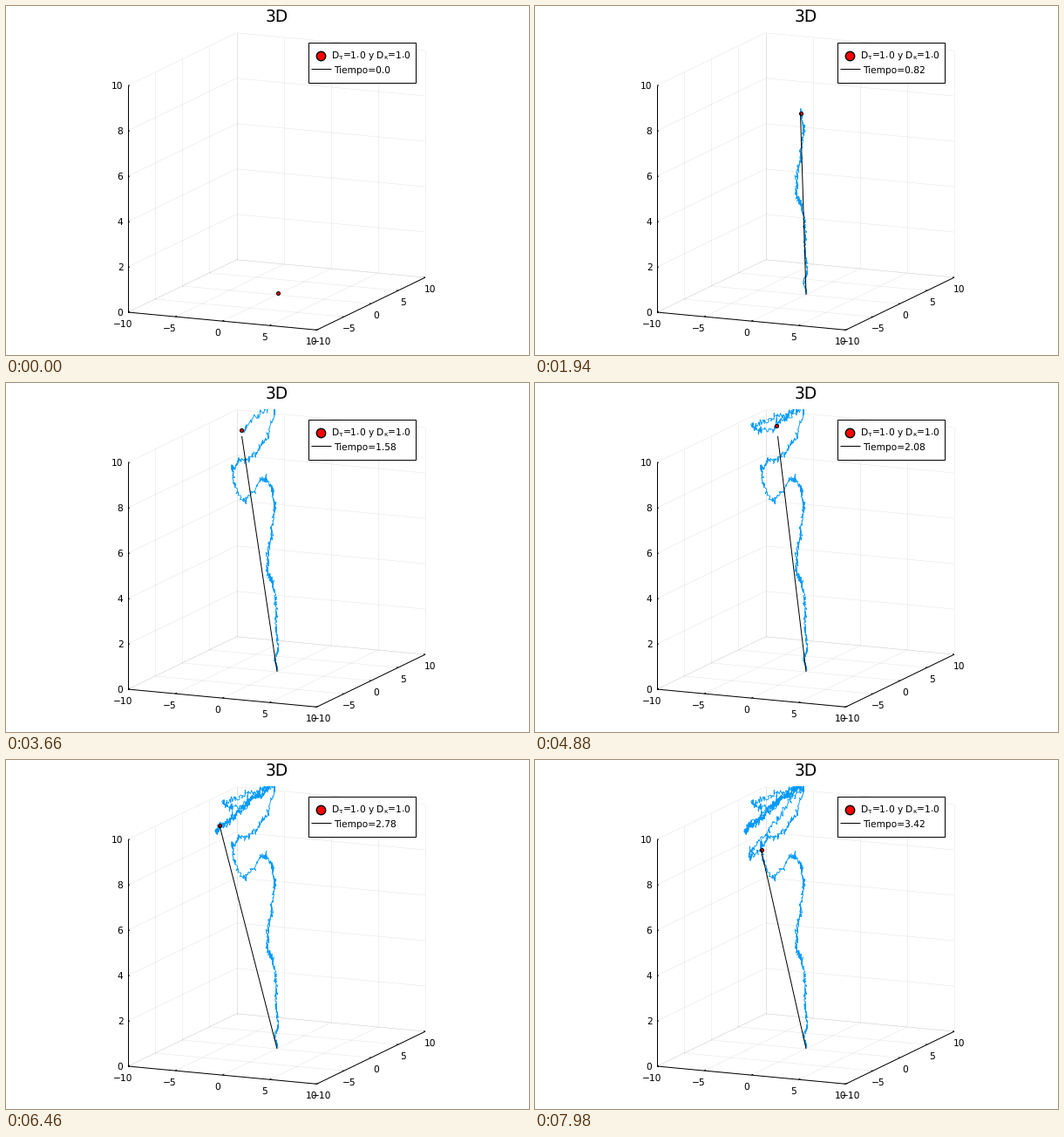
These frames come from a looping animation (600 px wide and 400 px high, 8 s). A matplotlib script:

```python
import numpy as np
import matplotlib.pyplot as plt
from matplotlib.animation import FuncAnimation
from matplotlib.collections import LineCollection
from matplotlib.patches import Rectangle
from matplotlib.transforms import Bbox

W, H, DPI = 600, 400, 100
PT = 72 / DPI               # points per pixel
STEPS = 171
SUB = 7                     # trail points per step
BLUE = "#009AFA"
ORIGIN = np.array([311.0, 331.0])
TOP = (308, 27)             # turning point just above the view

plt.rcParams.update({"font.family": "DejaVu Sans", "text.hinting": "none"})
fig = plt.figure(figsize=(W / DPI, H / DPI), dpi=DPI, facecolor="white")
ax = fig.add_axes([0, 0, 1, 1])
ax.set_xlim(0, W)
ax.set_ylim(H, 0)
ax.axis("off")


def proj(x, y, z):
    u, v = (x + 10) / 20, (y + 10) / 20
    return np.array([140 + 216.5 * u + 124.5 * v,
                     351 + 20.3 * u - 60.2 * v - 26 * z])


def label(x, y, s, px=10.67, ha="center"):
    return ax.text(x, y, s, fontsize=px * PT, ha=ha, va="baseline", zorder=10)


def segments(segs, color, lw, z):
    ax.add_collection(LineCollection(segs, colors=color, linewidths=lw * PT,
                                     zorder=z))


def draw_box():
    wide, tall = np.linspace(-10, 10, 5), np.linspace(0, 10, 6)
    grid, ticks = [], []
    for t in wide:
        grid += [(proj(t, -10, 0), proj(t, 10, 0)),
                 (proj(-10, t, 0), proj(10, t, 0)),
                 (proj(-10, t, 0), proj(-10, t, 10)),
                 (proj(t, 10, 0), proj(t, 10, 10))]
        name = f"{t:.0f}".replace("-", "\u2212")
        p, q = proj(t, -10, 0), proj(10, t, 0)
        ticks += [(p, p + (2, -1)), (q, q - (2, 0.2))]
        label(p[0] - 6, p[1] + 17, name)
        label(q[0] + 6, q[1] + 16.5, name)
    for t in tall:
        grid += [(proj(-10, -10, t), proj(-10, 10, t)),
                 (proj(-10, 10, t), proj(10, 10, t))]
        p = proj(-10, -10, t)
        ticks.append((p, p + (2, 0.2)))
        label(134.5, p[1] + 4, f"{t:.0f}", ha="right")
    left, front = proj(-10, -10, 0), proj(10, -10, 0)
    axes = [(left, proj(-10, -10, 10)), (left, front),
            (front, proj(10, 10, 0))]
    segments(grid, (0, 0, 0, 0.1), 0.55, 1)
    segments(axes + ticks, "black", 1, 2)


def draw_legend():
    ax.add_patch(Rectangle((346.5, 42), 123.5, 45.5, fc="white", ec="black",
                           lw=PT, zorder=8))
    ax.plot([361.4], [57], "o", ms=10.4 * PT, mfc="red", mec="black",
            mew=1.4 * PT, zorder=9)
    segments([((350, 72), (373, 72))], "black", 1, 9)
    label(372.6, 59.5, r"D$_{\mathregular{\tau}}$=1.0 y "
                       r"D$_{\mathregular{\kappa}}$=1.0", ha="left")
    return label(376, 76.5, "", ha="left")


# Turning points of the walk: step, (x, y)
TURNS = [(0, (312, 329)), (15, (308, 238)), (23, (300, 212)),
         (37, (308, 138)), (41, (304.5, 123)), (45, (295, 108)),
         (49, (277, 132)), (55, (259, 104)), (59, (265.5, 95)),
         (68, (298, 62)), (73, TOP), (79, (269.5, 54)), (83, (251, 53)),
         (96, TOP), (104, (277, 48.5)), (114, (242, 82)), (125, TOP),
         (139, (245, 75)), (150, TOP), (167, (247, 110)),
         (STEPS, (259.5, 103))]
T = np.array([t for t, _ in TURNS], float)
P = np.array([p for _, p in TURNS], float)
SLOPE = np.gradient(P, T, axis=0)


def particle(s):
    """Smooth cubic path through the turning points."""
    i = np.clip(np.searchsorted(T, s, side="right") - 1, 0, len(T) - 2)
    h = (T[i + 1] - T[i])[..., None]
    f = (np.asarray(s) - T[i])[..., None] / h
    ease = f * f * (3 - 2 * f)
    return (P[i] + (P[i + 1] - P[i]) * ease
            + h * f * (1 - f) * (SLOPE[i] * (1 - f) - SLOPE[i + 1] * f))


def make_trail():
    rng = np.random.default_rng(7)
    s = np.arange(STEPS * SUB + 1) / SUB
    jitter = rng.normal(size=(s.size, 2))
    drift = np.column_stack([np.convolve(j, np.ones(16) / 4, "same")
                             for j in jitter.T])
    trail = particle(s) + jitter * (0.8, 2) + drift * (0.8, 1.3)
    return np.minimum(trail, np.column_stack([np.where(s > 60, 308, 314),
                                              np.full(s.size, 331)]))


TRAIL = make_trail()

draw_box()
label(311, 18, "3D", 18.67)
clock = draw_legend()
trail, = ax.plot([], [], color=BLUE, lw=0.9 * PT, zorder=3)
dot, = ax.plot([], [], "o", ms=4 * PT, mfc="red", mec="black", mew=PT,
               zorder=4)
ray, = ax.plot([], [], color="black", lw=PT, solid_capstyle="butt", zorder=5)
view = Bbox.from_extents(140, H - 372, 482, H - 30)
for line in (trail, dot, ray):
    line.set_clip_box(view)


def step_at(ms):
    """Steps last 100, 20 and 20 ms in turn, after a first one of 20 ms."""
    if ms < 20:
        return 0
    turn, rest = divmod(ms - 20, 140)
    return 1 + 3 * turn + (rest >= 100) + (rest >= 120)


def update(frame):
    s = step_at(frame * 20)
    p = particle(s)
    trail.set_data(*np.vstack([TRAIL[:s * SUB], p]).T)
    dot.set_data([p[0]], [p[1]])
    dot.set_visible(bool(p[1] >= 31))
    reach = min(1, 270 / (ORIGIN[1] - p[1])) if s else 0
    ray.set_data(*np.array([ORIGIN, ORIGIN + reach * (p - ORIGIN)]).T)
    clock.set_text(f"Tiempo={round(s * 0.02, 2)}")
    return trail, dot, ray, clock


anim = FuncAnimation(fig, update, frames=400, interval=20, repeat=True,
                     repeat_delay=0, blit=False)
plt.show()
```
